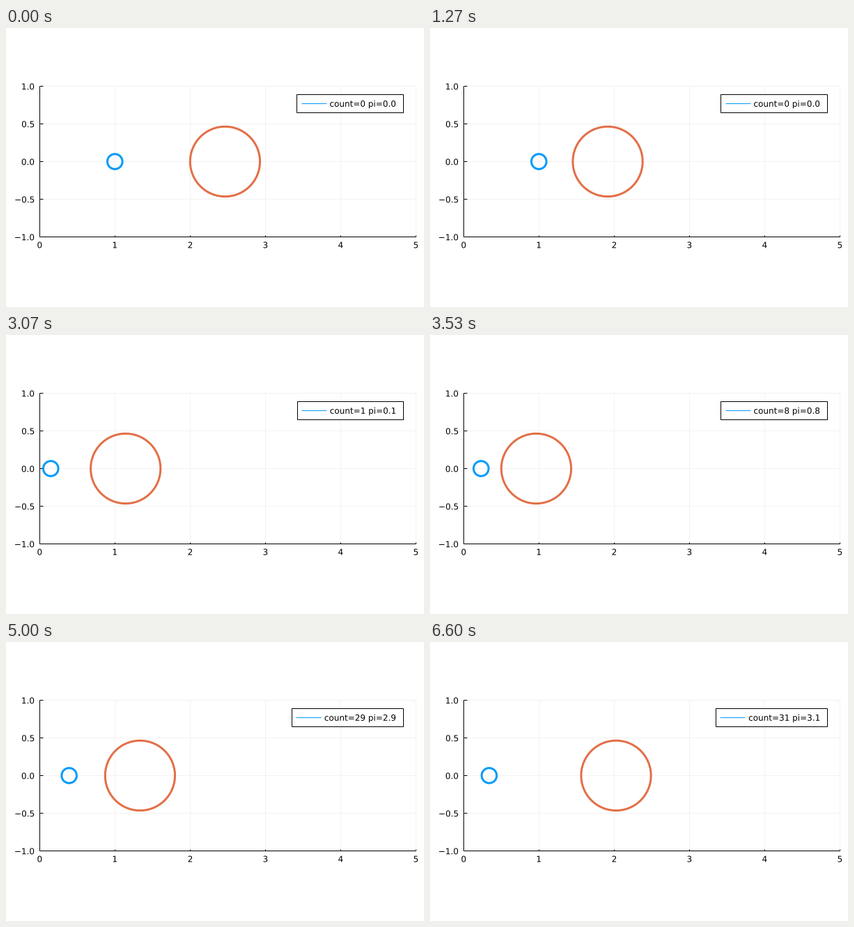
These frames come from a looping animation (600x400 px, 6670 ms). A matplotlib script:

```python
import numpy as np
import matplotlib.pyplot as plt
from matplotlib.animation import FuncAnimation
from matplotlib.patches import PathPatch, Rectangle
from matplotlib.path import Path
from matplotlib.textpath import TextPath

plt.rcParams["font.family"] = "DejaVu Sans"

W, H, DPI = 600, 400, 100
TICKS, INTERVAL = 667, 10           # 10 ms clock
POSES, RATE = 100, 0.15             # 15 poses per second
PX = 72 / DPI                       # one pixel in points
FONT = 12                           # text size in pixels
BLUE, ORANGE, GRID = "#009AFA", "#E36F47", "#F2F2F2"

MASS = 100                          # big mass over small mass
R1 = 0.1
R2 = R1 * MASS ** (1 / 3)
SPEED = 0.02892                     # start speed, units per pose


def px(x):
    return 48.3 + 108 * x


def py(y):
    return 191.48 - 108 * y


def collide(v1, v2):
    """Elastic collision of the small (1) and the big (MASS) ball."""
    total = 1 + MASS
    return (((1 - MASS) * v1 + 2 * MASS * v2) / total,
            ((MASS - 1) * v2 + 2 * v1) / total)


def simulate(n):
    """Positions and hit count at each pose."""
    x1, x2, v1, v2 = 1.0, 2 + R2, 0.0, -SPEED
    count, states = 0, []
    for _ in range(n):
        states.append((x1, x2, count))
        left = 1.0
        while True:
            to_wall = (x1 - R1) / -v1 if v1 < 0 else np.inf
            gap = max(x2 - x1 - R1 - R2, 0)
            to_ball = gap / (v1 - v2) if v1 > v2 else np.inf
            step = min(to_wall, to_ball, left)
            x1 += v1 * step
            x2 += v2 * step
            left -= step
            if left <= 0:
                break
            if to_ball <= to_wall:
                v1, v2 = collide(v1, v2)
                count += 1
            else:
                # a wall hit also passes momentum to the big ball
                x1 = R1
                v1, v2 = collide(-v1, v2)
                count += 2
                if v1 < 0:
                    v1 = -v1
                    count += 1
    return states


states = simulate(POSES)

fig = plt.figure(figsize=(W / DPI, H / DPI), dpi=DPI, facecolor="white")
ax = fig.add_axes([0, 0, 1, 1])
ax.set_xlim(0, W)
ax.set_ylim(H, 0)
ax.axis("off")


def text_path(s, x, base, align):
    """Outline of s with its ink aligned to x (0 left, 0.5 centre, 1 right)."""
    outline = TextPath((0, 0), s, size=FONT)
    ink = outline.get_extents()
    shift = x - ink.x0 - align * ink.width
    return Path(outline.vertices * [1, -1] + [shift, base], outline.codes)


def add_text(s, x, base, align):
    patch = PathPatch(text_path(s, x, base, align), fc="black", lw=0,
                      snap=False, zorder=5)
    ax.add_patch(patch)
    return patch


def line(color, width, z):
    return ax.plot([], [], color=color, lw=width * PX, zorder=z,
                   solid_capstyle="butt")[0]


left, right, top, bottom = px(0), px(5), py(1), py(-1)
cols = px(np.arange(6))
rows = py(np.linspace(-1, 1, 5))

ax.vlines(cols, top, bottom, GRID, lw=PX, zorder=1)
ax.hlines(rows, left, right, GRID, lw=PX, zorder=1)
ax.vlines(cols, bottom - 2.8, bottom, "black", lw=PX, zorder=2)
ax.hlines(rows, left, left + 5, "black", lw=PX, zorder=2)
ax.vlines([left], top, bottom, "black", lw=PX, zorder=2)
ax.hlines([bottom], left, right, "black", lw=PX, zorder=2)
ax.set_xlim(0, W)
ax.set_ylim(H, 0)

for x in range(6):
    add_text(str(x), px(x), 315.4, 0.5)
for y in np.linspace(-1, 1, 5):
    add_text(f"{y:.1f}".replace("-", "\u2212"), 40.2, py(y) + 4.8, 1)

angle = np.linspace(0, 2 * np.pi, 181)
plot_area = Rectangle((48, top), right - 48, bottom - top,
                      transform=ax.transData)


def ring(color):
    curve = line(color, 3, 3)
    curve.set_clip_path(plot_area)
    return curve


def place(curve, x, r):
    curve.set_data(px(x + r * np.cos(angle)), py(r * np.sin(angle)))


small, big = ring(BLUE), ring(ORANGE)
box = Rectangle((417, 95.3), 153, 26, fc="white", ec="black", lw=PX, zorder=4)
ax.add_patch(box)
key = line(BLUE, 1, 5)
label = add_text("count=0 pi=0.0", 559.1, 112.8, 1)


def draw(i):
    x1, x2, count = states[int((i + 0.5) * RATE)]
    place(small, x1, R1)
    place(big, x2, R2)
    path = text_path(f"count={count} pi={count / 10}", 559.1, 112.8, 1)
    label.set_path(path)
    start = path.get_extents().x0 - 47.8
    box.set_x(start)
    box.set_width(570.2 - start)
    key.set_data([start + 6.2, start + 42.2], [108.3, 108.3])
    return small, big, box, key, label


anim = FuncAnimation(fig, draw, frames=TICKS, init_func=lambda: draw(0),
                     interval=INTERVAL, repeat=True, repeat_delay=0)
plt.show()
```
